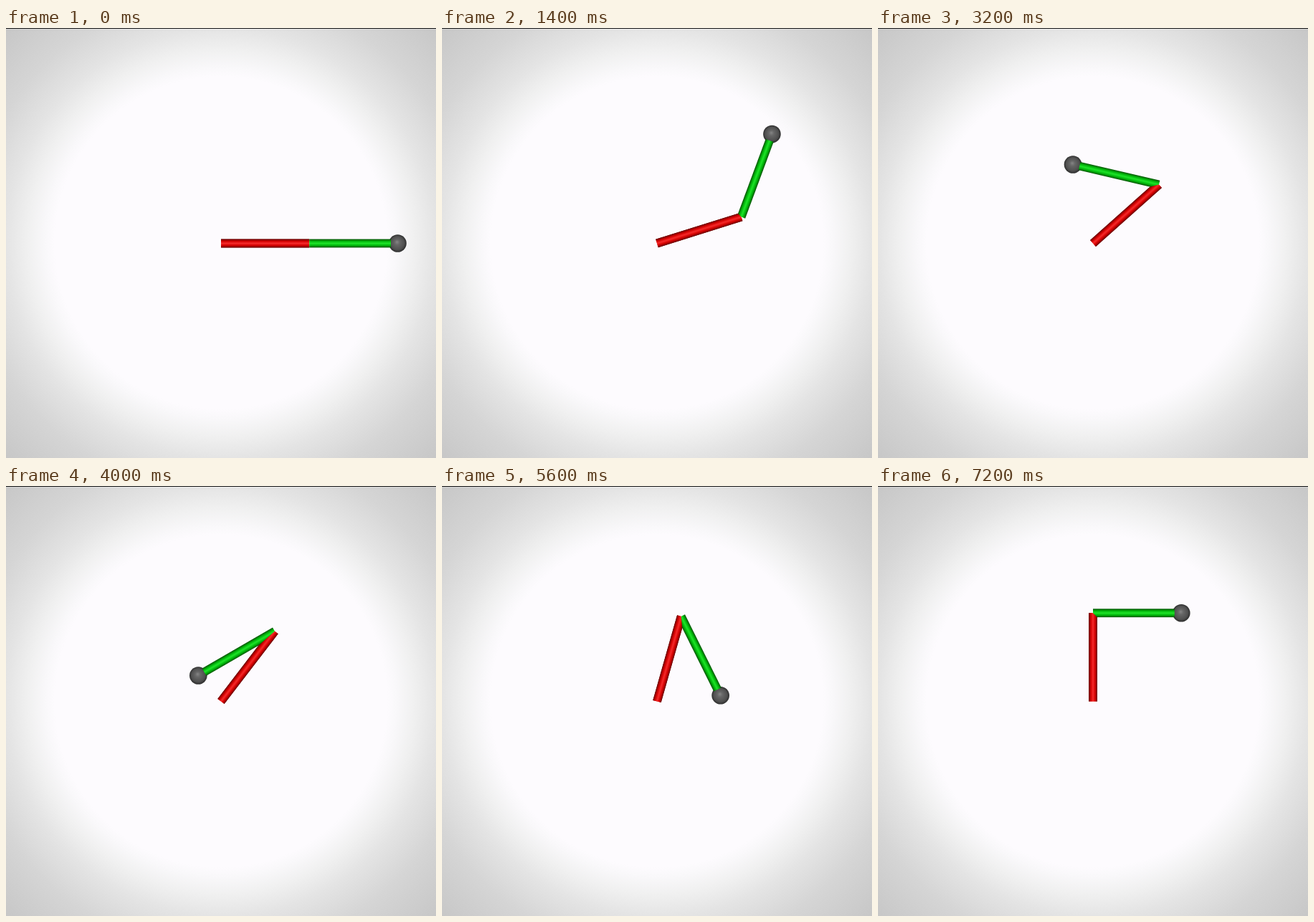
An HTML page with a canvas that plays this animation: 600 px wide and 600 px high, repeating every 7300 ms.

```html
<!DOCTYPE html>
<html lang="en">
<head>
<meta charset="utf-8">
<title>Two-link arm</title>
<style>
  html, body { margin: 0; width: 100%; height: 100%; overflow: hidden; }
  body {
    background: radial-gradient(circle 424px at 300px 300px,
      #fdfbfe 232px, #f9f8fa 245px, #f0f0f0 270px, #e4e4e4 300px, #d5d5d5 350px, #c7c7c7 424px);
  }
  body::before {
    content: ""; position: absolute; top: 0; left: 0;
    width: 100%; height: 1px; background: #161616;
  }
  canvas { display: block; width: 600px; height: 600px; }
</style>
</head>
<body>
<canvas id="stage" width="600" height="600"></canvas>
<script>
const ctx = document.getElementById('stage').getContext('2d');

const STEP = 100, STEPS = 73, LAST = STEPS - 1;
const BASE = { x: 300, y: 300.5 };
const LINK = 123.25, HALF = 5.9, BALL = 12.3, BALL_GAP = 9.5;

// Trapezoidal speed profile, in degrees and steps
const TURN = 90, SPEED = 1.35, RAMP_UP = 2.2;
const RAMP_DOWN = 2 * (LAST - RAMP_UP / 2 - TURN / SPEED);

function shoulder(n) {
  if (n < RAMP_UP) return SPEED * n * n / (2 * RAMP_UP);
  const left = LAST - n;
  if (left < RAMP_DOWN) return TURN - SPEED * left * left / (2 * RAMP_DOWN);
  return SPEED * (n - RAMP_UP / 2);
}

function shade(edge, body, shine) {
  const g = ctx.createLinearGradient(0, -HALF, 0, HALF);
  g.addColorStop(0, edge);
  g.addColorStop(0.25, body);
  g.addColorStop(0.5, shine);
  g.addColorStop(0.75, body);
  g.addColorStop(1, edge);
  return g;
}

const RED = shade('#6a0000', '#d20000', '#f52a2a');
const GREEN = shade('#004f00', '#00b40a', '#1ee428');
const GREY = ctx.createRadialGradient(-1, -2, 0, 0, 0, BALL);
GREY.addColorStop(0, '#858585');
GREY.addColorStop(0.3, '#666');
GREY.addColorStop(0.75, '#505050');
GREY.addColorStop(1, '#2c2c2c');

const polar = (p, a, r) => ({ x: p.x + r * Math.cos(a), y: p.y - r * Math.sin(a) });

function rod(p, angle, length, fill) {
  ctx.save();
  ctx.translate(p.x, p.y);
  ctx.rotate(-angle);
  ctx.fillStyle = fill;
  ctx.fillRect(0, -HALF, length, 2 * HALF);
  ctx.restore();
}

function ball(p) {
  ctx.save();
  ctx.translate(p.x, p.y);
  ctx.fillStyle = GREY;
  ctx.beginPath();
  ctx.arc(0, 0, BALL, 0, 2 * Math.PI);
  ctx.fill();
  ctx.restore();
}

// Keeps only the side of the elbow's bisector that belongs to the lower rod
function clipToLower(elbow, a, b) {
  const dx = -Math.cos(a) - Math.cos(b), dy = Math.sin(a) + Math.sin(b);
  ctx.translate(elbow.x, elbow.y);
  ctx.rotate(Math.atan2(dy, dx));
  ctx.beginPath();
  ctx.rect(0, -300, 300, 600);
  ctx.setTransform(1, 0, 0, 1, 0, 0);
  ctx.clip();
}

function draw(n) {
  const a = shoulder(n) * Math.PI / 180, b = 4 * a;
  const elbow = polar(BASE, a, LINK);
  ctx.clearRect(0, 0, 600, 600);
  rod(BASE, a, LINK, RED);
  ball(polar(elbow, b, LINK));
  rod(elbow, b, LINK - BALL_GAP, GREEN);
  ctx.save();
  clipToLower(elbow, a, b);
  rod(BASE, a, LINK, RED);
  ctx.restore();
}

const start = performance.now();
function tick() {
  draw(Math.floor((performance.now() - start) / STEP) % STEPS);
  requestAnimationFrame(tick);
}
tick();
</script>
</body>
</html>
```
